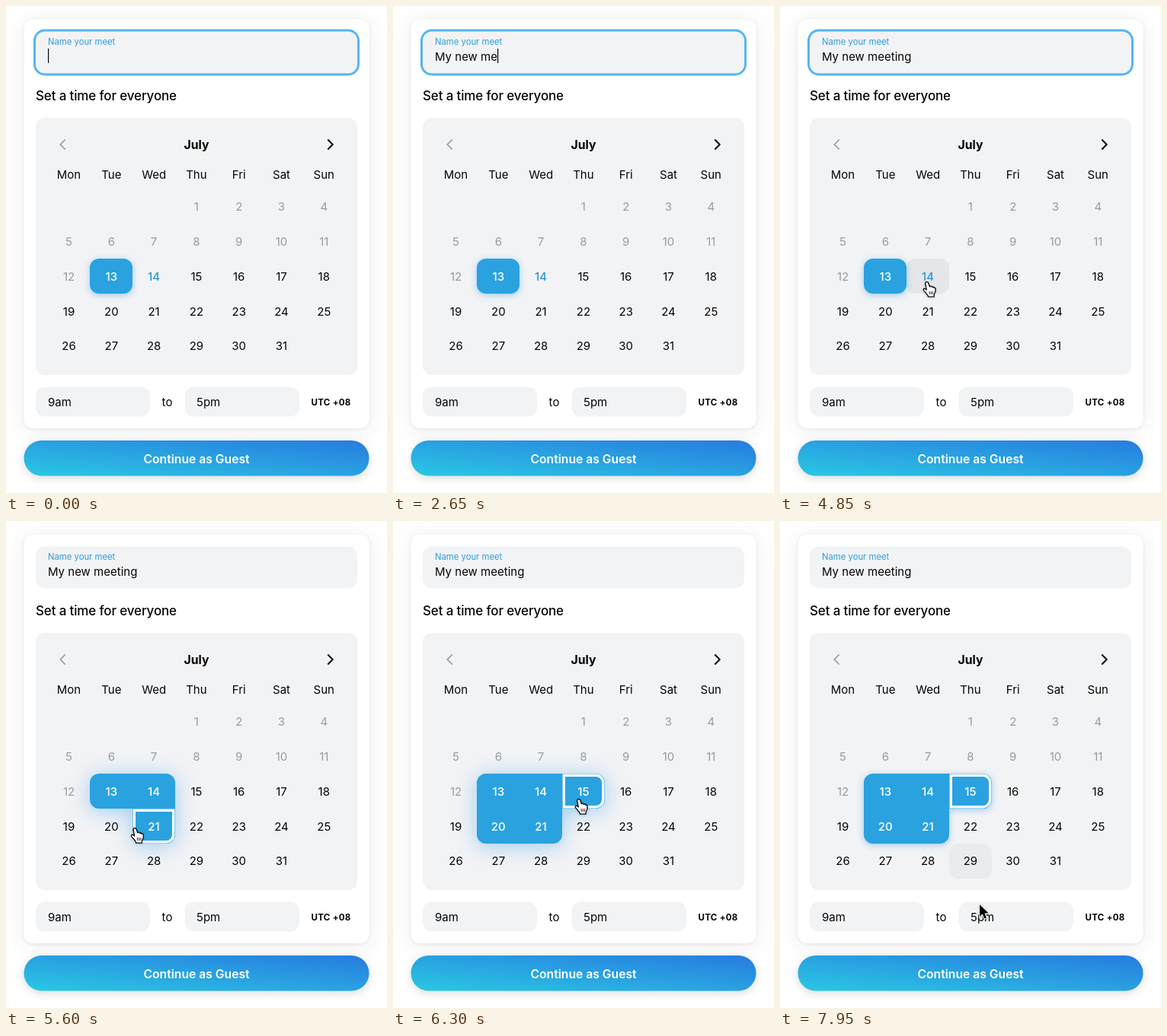
Animation, 500 px wide and 640 px high, one loop 8 s. Source, as an HTML page with a canvas:

```html
<!DOCTYPE html>
<html lang="en">
<head>
<meta charset="utf-8">
<title>Meeting scheduler</title>
<style>
html, body { margin: 0; width: 100%; height: 100%; overflow: hidden; background: #fff; }
canvas { display: block; width: 500px; height: 640px; }
</style>
</head>
<body>
<canvas></canvas>
<script>
const LOOP = 8000;
const BLUE = '#2aa2e0', PANEL = '#f2f3f5', INK = '#050505', MUTED = '#989b9f';
const canvas = document.querySelector('canvas');
const ctx = canvas.getContext('2d');
const dpr = window.devicePixelRatio || 1;
canvas.width = 500 * dpr;
canvas.height = 640 * dpr;

// Timeline: typing, caret toggles, day picks and pointer path [ms, x, y]
const TITLE = 'My new meeting';
const KEY_TIMES = [1900, 2000, 2100, 2150, 2250, 2300, 2400, 2550, 2650, 2700, 2800, 2950, 3050, 3150];
const CARET_TOGGLES = [500, 1000, 1500, 1900, 3400, 4150, 4650, 5150];
const BLUR_TIME = 5300;
const PICKS = [[-1, 13], [5300, 14], [5500, 21], [5700, 20], [6250, 15]];
const PATH = [
  [3800, 16, 645], [3900, 42, 591], [4000, 76, 538], [4150, 125, 465], [4300, 165, 410],
  [4430, 186, 376], [4550, 193, 363], [5300, 193, 363], [5400, 193, 383], [5500, 189, 404],
  [5700, 150, 404], [5820, 145, 394], [5950, 151.5, 373], [6100, 206, 364], [6250, 244, 366],
  [6700, 244, 366], [6950, 245, 384], [7250, 248, 410], [7600, 248, 410], [7750, 251, 432],
  [7880, 256, 468], [7950, 262, 504], [8000, 262, 504]
];

const HAND = new Path2D('M-2.2 1.8C-2.6-.6 1-1.2 1.8 1.2L3.4 6C4.2 4.8 6 5 6.4 6.6C7.2 5.6 8.6 6 8.9 7.4' +
  'C10 6.8 11 7.6 11 9C11.2 12 10.6 14 9.2 16L9 19L1.5 19L1 17.2C-1 15.2-2 13-4.2 10.8' +
  'C-5.4 9.4-4.4 7.6-2.6 8.6L-.6 10Z');
const FINGERS = new Path2D('M3 12L3.3 16M5.3 12L5.5 16M7.6 12L7.6 16');
const ARROW = new Path2D('M0 0V16L3.8 12.6L6.3 18.6L9 17.4L6.5 11.6L11.6 11.3Z');

const edgeX = col => Math.round(54.6 + 55.8 * col);
const edgeY = row => Math.round(240.6 + 45.8 * row);

function cellOf(day) {
  const slot = day + 2, col = slot % 7, row = Math.floor(slot / 7);
  const x = edgeX(col), y = edgeY(row);
  return { col, row, x, y, w: edgeX(col + 1) - x, h: edgeY(row + 1) - y };
}

function pointerAt(t) {
  const i = PATH.findIndex(p => p[0] > t);
  if (i < 1) return null;
  const [t0, x0, y0] = PATH[i - 1], [t1, x1, y1] = PATH[i];
  const k = (t - t0) / (t1 - t0);
  return { x: x0 + (x1 - x0) * k, y: y0 + (y1 - y0) * k };
}

function hoverAt(t) {
  const p = pointerAt(t);
  if (!p) return null;
  if (p.x > 23 && p.x < 477 && p.y > 571 && p.y < 618) return 'button';
  for (let day = 13; day <= 31; day++) {
    const c = cellOf(day);
    if (p.x >= c.x && p.x < c.x + c.w && p.y >= c.y && p.y < c.y + c.h) return day;
  }
  return null;
}

const picksAt = t => PICKS.filter(p => p[0] <= t).map(p => p[1]);

// Share of the recent past in which a condition held: a linear transition.
function fade(t, duration, test) {
  const steps = 12;
  let hits = 0;
  for (let i = 0; i < steps; i++) if (test(t - duration * i / steps)) hits++;
  return hits / steps;
}

function box(x, y, w, h, radius, fill) {
  ctx.beginPath();
  ctx.roundRect(x, y, w, h, radius);
  ctx.fillStyle = fill;
  ctx.fill();
}

function withShadow(color, blur, dy, draw) {
  ctx.save();
  ctx.shadowColor = color;
  ctx.shadowBlur = blur * dpr;
  ctx.shadowOffsetY = dy * dpr;
  draw();
  ctx.restore();
}

function text(str, x, y, { size = 15, weight = 400, color = INK, align = 'left', spacing = 0 } = {}) {
  ctx.font = `${weight} ${size}px Inter, sans-serif`;
  ctx.letterSpacing = spacing + 'px';
  ctx.textAlign = align;
  ctx.fillStyle = color;
  ctx.fillText(str, x, y);
}

function chevron(x, dir, color, width) {
  ctx.beginPath();
  ctx.moveTo(x - 3.2 * dir, 175.5);
  ctx.lineTo(x + 3.2 * dir, 182);
  ctx.lineTo(x - 3.2 * dir, 188.5);
  ctx.strokeStyle = color;
  ctx.lineWidth = width;
  ctx.stroke();
}

function drawNameField(t) {
  const focus = 1 - fade(t, 120, s => s >= BLUR_TIME);
  if (focus) {
    ctx.globalAlpha = focus;
    box(36, 30.5, 428, 61, 15, '#55b6ec');
    ctx.globalAlpha = 1;
  }
  box(39, 33.5, 422, 55, 12, PANEL);
  text('Name your meet', 55, 51, { size: 11.3, color: '#2c9dd8' });
  const typed = TITLE.slice(0, KEY_TIMES.filter(k => k <= t).length);
  text(typed, 55, 71.5);
  const caretOn = CARET_TOGGLES.filter(c => c <= t).length % 2 === 0;
  if (caretOn && t < BLUR_TIME) {
    ctx.fillStyle = INK;
    ctx.fillRect(Math.round(54.6 + ctx.measureText(typed).width), 56, 1.2, 19);
  }
}

function drawSelection(t) {
  const picks = picksAt(t);
  const has = (col, row) => picks.includes(row * 7 + col - 2);
  const radii = ({ col, row }, r) => [[-1, -1], [1, -1], [1, 1], [-1, 1]]
    .map(([dx, dy]) => has(col + dx, row) || has(col, row + dy) ? 0 : r);
  const glow = fade(t, 200, s => picksAt(s).includes(hoverAt(s)));

  const shape = new Path2D();
  for (const day of picks) {
    const c = cellOf(day);
    shape.roundRect(c.x, c.y, c.w, c.h, radii(c, 12));
  }
  ctx.fillStyle = BLUE;
  withShadow('rgba(42,150,235,.42)', 9 + 31 * glow, 2 + 2 * glow, () => ctx.fill(shape));

  if (picks.length > 1) {
    const c = cellOf(picks[picks.length - 1]);
    ctx.beginPath();
    ctx.roundRect(c.x + 2.3, c.y + 2.3, c.w - 4.6, c.h - 4.6, radii(c, 9.5));
    ctx.strokeStyle = '#fff';
    ctx.lineWidth = 3.4;
    ctx.stroke();
  }
  return picks;
}

function drawCalendar(t) {
  box(39, 147, 422, 338, 12, PANEL);
  chevron(74.5, -1, '#96989c', 1.6);
  chevron(425.5, 1, INK, 2);
  text('July', 250, 187.7, { size: 15.8, weight: 700, align: 'center' });
  'Mon Tue Wed Thu Fri Sat Sun'.split(' ').forEach((name, i) =>
    text(name, 82.5 + 55.8 * i, 226.7, { align: 'center' }));

  for (let day = 13; day <= 31; day++) {
    const alpha = fade(t, 150, s => hoverAt(s) === day);
    const c = cellOf(day);
    if (alpha) box(c.x, c.y, c.w, c.h, 12, `rgba(20,24,34,${0.06 * alpha})`);
  }
  const picks = drawSelection(t);
  for (let day = 1; day <= 31; day++) {
    const { col, row } = cellOf(day);
    const picked = picks.includes(day);
    const color = picked ? '#fff' : day < 13 ? MUTED : day === 14 ? '#2b98d4' : INK;
    text(day, 82.5 + 55.8 * col, 269.2 + 45.8 * row,
      { color, align: 'center', weight: picked || day === 14 ? 500 : 400 });
  }
}

function drawTimes() {
  box(39, 500.5, 150, 39, 12, PANEL);
  box(234.5, 500.5, 150.5, 39, 12, PANEL);
  text('9am', 55, 526);
  text('to', 211.5, 526, { align: 'center' });
  text('5pm', 250, 526);
  text('UTC +08', 400.5, 525, { size: 11.5, weight: 700, spacing: 0.3 });
}

function drawButton(t) {
  const hover = fade(t, 150, s => hoverAt(s) === 'button');
  const fill = ctx.createLinearGradient(245.4, 639.8, 254.6, 548.5);
  fill.addColorStop(0, '#29c8e3');
  fill.addColorStop(0.5, '#29a1e1');
  fill.addColorStop(1, '#277be0');
  withShadow(`rgba(${20 * hover},${120 * hover},${190 * hover},${0.14 + 0.16 * hover})`,
    12 + 16 * hover, 3 + hover, () => box(23.5, 571, 453, 46.5, 23.25, fill));
  text('Continue as Guest', 250, 600.8, { size: 15.7, weight: 600, color: '#fff', align: 'center' });
}

function drawPointer(t) {
  const p = pointerAt(t);
  if (!p) return;
  const hand = hoverAt(t) !== null;
  ctx.save();
  ctx.translate(p.x, p.y);
  ctx.lineJoin = 'round';
  ctx.lineWidth = hand ? 1.2 : 2;
  ctx.strokeStyle = hand ? '#111' : '#fff';
  ctx.fillStyle = hand ? '#fff' : '#000';
  const shape = hand ? HAND : ARROW;
  withShadow('rgba(0,0,0,.3)', 3, 1, () => ctx.stroke(shape));
  ctx.fill(shape);
  if (hand) {
    ctx.stroke(shape);
    ctx.lineWidth = 0.9;
    ctx.stroke(FINGERS);
  }
  ctx.restore();
}

function render(t) {
  ctx.setTransform(dpr, 0, 0, dpr, 0, 0);
  ctx.fillStyle = '#fff';
  ctx.fillRect(0, 0, 500, 640);
  withShadow('rgba(0,0,0,.07)', 32, 4, () => box(23.5, 17.5, 453, 537.5, 12, '#fff'));
  withShadow('rgba(0,0,0,.08)', 5, 1, () => box(23.5, 17.5, 453, 537.5, 12, '#fff'));
  drawNameField(t);
  text('Set a time for everyone', 39, 124, { size: 17, weight: 500, spacing: -0.15 });
  drawCalendar(t);
  drawTimes();
  drawButton(t);
  drawPointer(t);
}

const start = performance.now();
function tick() {
  render((performance.now() - start) % LOOP);
  requestAnimationFrame(tick);
}
tick();
</script>
</body>
</html>
```
